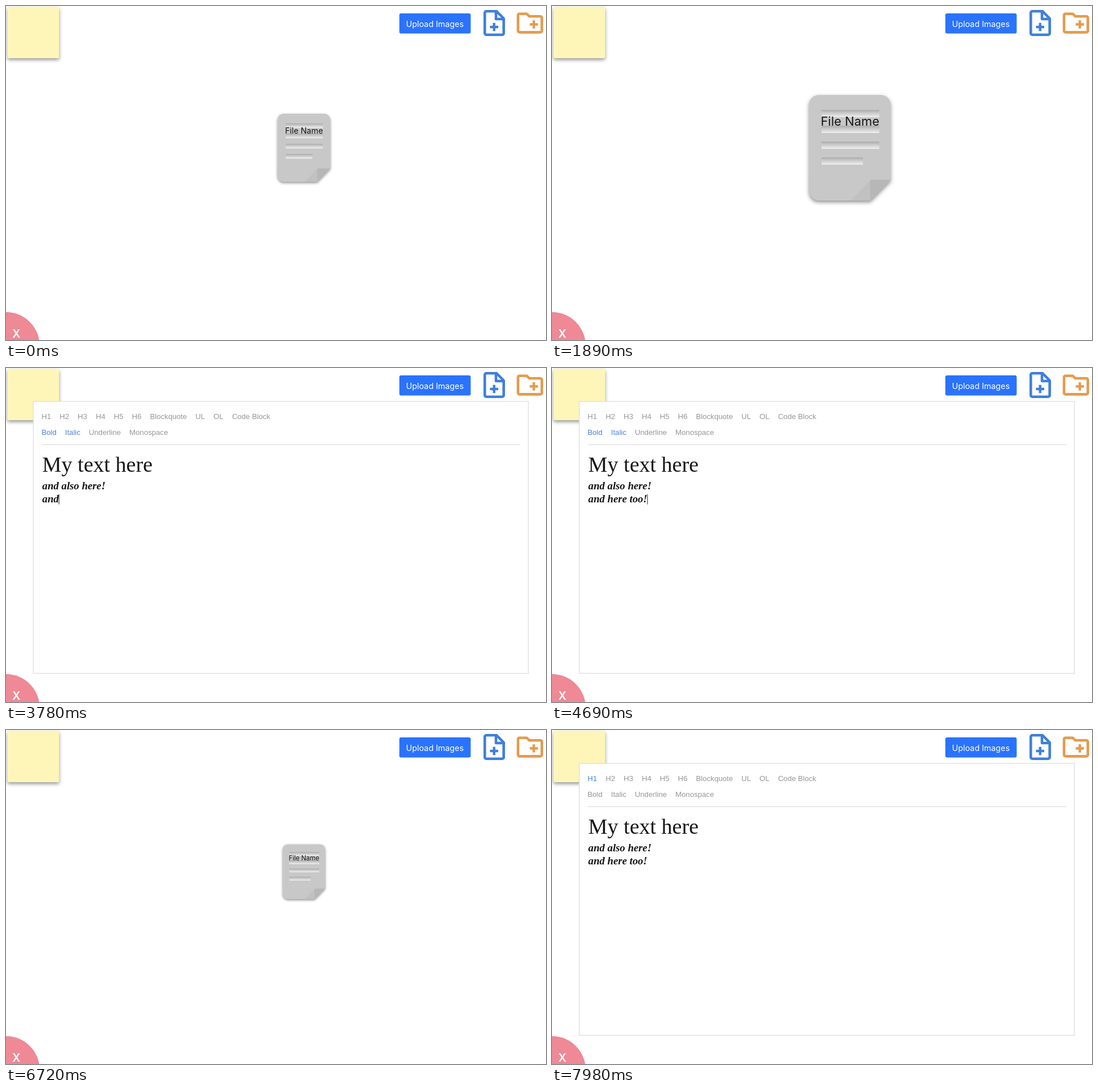
Animation of 950 by 589 pixels, one loop 8 s. Source, as an HTML page with a canvas:

```html
<!DOCTYPE html>
<html lang="en">
<head>
<meta charset="utf-8">
<title>File board</title>
<style>
  html, body { margin: 0; width: 100%; height: 100%; overflow: hidden; background: #fff; }
  canvas { display: block; width: 950px; height: 589px; }
</style>
</head>
<body>
<canvas id="stage"></canvas>
<script>
const W = 950, H = 589, LOOP = 8000, STEP = 70;
const UI = 'Inter, Roboto, sans-serif';
const TOOL = '"Liberation Sans", Arial, sans-serif';
const SERIF = '"Liberation Serif", Georgia, serif';

const canvas = document.getElementById('stage');
const ctx = canvas.getContext('2d');
const dpr = window.devicePixelRatio || 1;
canvas.width = W * dpr;
canvas.height = H * dpr;

// Press, release and overshoot of the file: [time, scale]
const PRESSES = [
  [0, 1], [1190, 1], [1470, 0.612], [1610, 0.6], [1890, 1.55], [2030, 1.55],
  [2031, 1], [6650, 1], [6790, 0.61], [6860, 0.65], [7000, 1.555], [8000, 1.555]
];
const TYPED = 'and here too!';
const KEY_TIMES = [3570, 3640, 3780, 3850, 3920, 3990, 4060, 4270, 4340, 4410, 4480, 4550, 4690];
const BLOCKS = ['H1', 'H2', 'H3', 'H4', 'H5', 'H6', 'Blockquote', 'UL', 'OL', 'Code Block'];
const INLINES = ['Bold', 'Italic', 'Underline', 'Monospace'];

const within = (t, a, b) => t >= a && t < b;

function scaleAt(t) {
  const i = PRESSES.findIndex(p => p[0] > t);
  const [t0, s0] = PRESSES[i - 1], [t1, s1] = PRESSES[i];
  const k = (t - t0) / (t1 - t0);
  return s0 + (s1 - s0) * k * k * (3 - 2 * k);
}

function text(str, x, y, font, color, align = 'left') {
  ctx.font = font;
  ctx.fillStyle = color;
  ctx.textAlign = align;
  ctx.fillText(str, x, y);
}

function roundRect(x, y, w, h, r, color) {
  ctx.beginPath();
  ctx.roundRect(x, y, w, h, r);
  ctx.fillStyle = color;
  ctx.fill();
}

function shadow(color, blur, dy) {
  ctx.shadowColor = color;
  ctx.shadowBlur = blur * dpr;
  ctx.shadowOffsetY = dy * dpr;
}

function plus(x, y, size, weight, color) {
  ctx.fillStyle = color;
  ctx.fillRect(x - size / 2, y - weight / 2, size, weight);
  ctx.fillRect(x - weight / 2, y - size / 2, weight, size);
}

function outline(color, weight) {
  ctx.strokeStyle = color;
  ctx.lineWidth = weight;
  ctx.lineJoin = 'round';
  ctx.stroke();
}

function drawNote() {
  ctx.save();
  shadow('rgba(0,0,0,.42)', 6, 3);
  roundRect(2.5, 1.5, 91, 90.5, 3, '#fef6b9');
  ctx.restore();
}

function drawButton() {
  roundRect(692, 13, 125.5, 35.5, 3, '#2a73ff');
  text('Upload Images', 754.5, 36.5, '14.3px ' + UI, '#fff', 'center');
}

function drawFileIcon() {
  const blue = '#407fdc';
  ctx.beginPath();
  ctx.moveTo(863, 9.3);
  ctx.lineTo(845, 9.3);
  ctx.arcTo(842.3, 9.3, 842.3, 12, 2.7);
  ctx.arcTo(842.3, 50.7, 845, 50.7, 2.7);
  ctx.arcTo(875.6, 50.7, 875.6, 48, 2.7);
  ctx.lineTo(875.6, 22);
  ctx.closePath();
  ctx.moveTo(862, 10);
  ctx.lineTo(862, 23);
  ctx.lineTo(875, 23);
  outline(blue, 4.6);
  plus(858.7, 37, 14.5, 4.4, blue);
}

function drawFolderIcon() {
  const orange = '#e49b4d';
  ctx.beginPath();
  ctx.moveTo(903, 13.7);
  ctx.lineTo(916, 13.7);
  ctx.lineTo(920.7, 18.3);
  ctx.arcTo(942.7, 18.3, 942.7, 21, 2.7);
  ctx.arcTo(942.7, 46.4, 940, 46.4, 2.7);
  ctx.arcTo(900.8, 46.4, 900.8, 43, 2.7);
  ctx.arcTo(900.8, 13.7, 904, 13.7, 2.7);
  ctx.closePath();
  outline(orange, 4.6);
  plus(928.6, 32.4, 14.5, 4.4, orange);
}

function drawBin() {
  ctx.beginPath();
  ctx.arc(0, 599, 59.2, 0, Math.PI * 2);
  ctx.fillStyle = '#ee8995';
  ctx.fill();
  text('X', 18.3, 585.3, '600 20px ' + UI, '#fff', 'center');
}

function triangle(x, y, w, h, color) {
  ctx.beginPath();
  ctx.moveTo(x, y);
  ctx.lineTo(x + w, y);
  ctx.lineTo(x, y + h);
  ctx.fillStyle = color;
  ctx.fill();
}

function drawSlot(y, w) {
  const g = ctx.createLinearGradient(0, y, 0, y + 8.2);
  g.addColorStop(0, '#a9a9a9');
  g.addColorStop(0.35, '#c6c6c6');
  g.addColorStop(0.75, '#dedede');
  g.addColorStop(1, '#f1f1f1');
  ctx.fillStyle = g;
  ctx.fillRect(-32.3, y, w, 8.2);
}

function drawFile(s) {
  ctx.save();
  ctx.translate(524.3, 250);
  ctx.scale(s, s);

  ctx.save();
  shadow('rgba(0,0,0,.45)', 5 * s, 2 * s);
  ctx.beginPath();
  ctx.moveTo(0, -60);
  ctx.arcTo(46, -60, 46, 0, 11);
  ctx.lineTo(46, 36.5);
  ctx.lineTo(23, 60);
  ctx.arcTo(-46.4, 60, -46.4, 0, 11);
  ctx.arcTo(-46.4, -60, 0, -60, 11);
  ctx.closePath();
  ctx.fillStyle = '#c8c8c8';
  ctx.fill();
  ctx.restore();

  triangle(23, 36.5, -22, 23.5, '#c8c8c8');
  ctx.beginPath();
  ctx.moveTo(23, 37);
  ctx.lineTo(23, 60);
  ctx.lineTo(1, 60);
  ctx.fillStyle = '#c1c1c1';
  ctx.fill();
  triangle(23, 36.5, 23, 23.5, '#b7b7b7');

  [-43, -25, -7].forEach(y => drawSlot(y, 65.5));
  drawSlot(11, 47);
  text('File Name', 0, -25, '14.15px ' + UI, '#161616', 'center');
  ctx.restore();
}

function drawTools(labels, y, isActive) {
  let x = 62.5;
  for (const label of labels) {
    text(label, x, y, '13.15px ' + TOOL, isActive(label) ? '#4a82e0' : '#969696');
    x += ctx.measureText(label).width + 15;
  }
}

function drawCaret(x, y) {
  ctx.fillStyle = '#222';
  ctx.fillRect(x, y, 1, 18);
}

function drawEditor(t) {
  const styled = within(t, 2590, 5880);
  const count = KEY_TIMES.filter(k => k <= t).length;
  const line = TYPED.slice(0, count);
  const body = 'italic bold 18.7px ' + SERIF;

  ctx.fillStyle = '#fff';
  ctx.fillRect(48, 59, 871, 479.5);
  ctx.strokeStyle = '#dedede';
  ctx.lineJoin = 'miter';
  ctx.lineWidth = 1.3;
  ctx.strokeRect(48, 59, 871, 479.5);

  drawTools(BLOCKS, 89.7, name => !styled && name === 'H1');
  drawTools(INLINES, 117.9, name => styled && (name === 'Bold' || name === 'Italic'));
  ctx.fillStyle = '#dfdfdf';
  ctx.fillRect(63, 134.4, 842, 1.3);

  text('My text here', 63.8, 183, '38px ' + SERIF, '#161616');
  text('and also here!', 63.8, 214.3, body, '#161616');
  text(line, 63.8, 236.6, body, '#161616');

  if (within(t, 2590, 3080)) drawCaret(177, 200);
  if (within(t, 3290, 5320)) drawCaret(63.6 + ctx.measureText(line).width, 222.5);
}

function draw(t) {
  ctx.setTransform(dpr, 0, 0, dpr, 0, 0);
  ctx.fillStyle = '#fff';
  ctx.fillRect(0, 0, W, H);
  drawNote();
  drawButton();
  drawFileIcon();
  drawFolderIcon();
  if (within(t, 2030, 5880) || t >= 7070) drawEditor(t);
  else drawFile(scaleAt(t));
  drawBin();
}

function tick(now) {
  const t = now % LOOP;
  draw(Math.floor(t / STEP) * STEP);
  requestAnimationFrame(tick);
}
requestAnimationFrame(tick);
</script>
</body>
</html>
```
